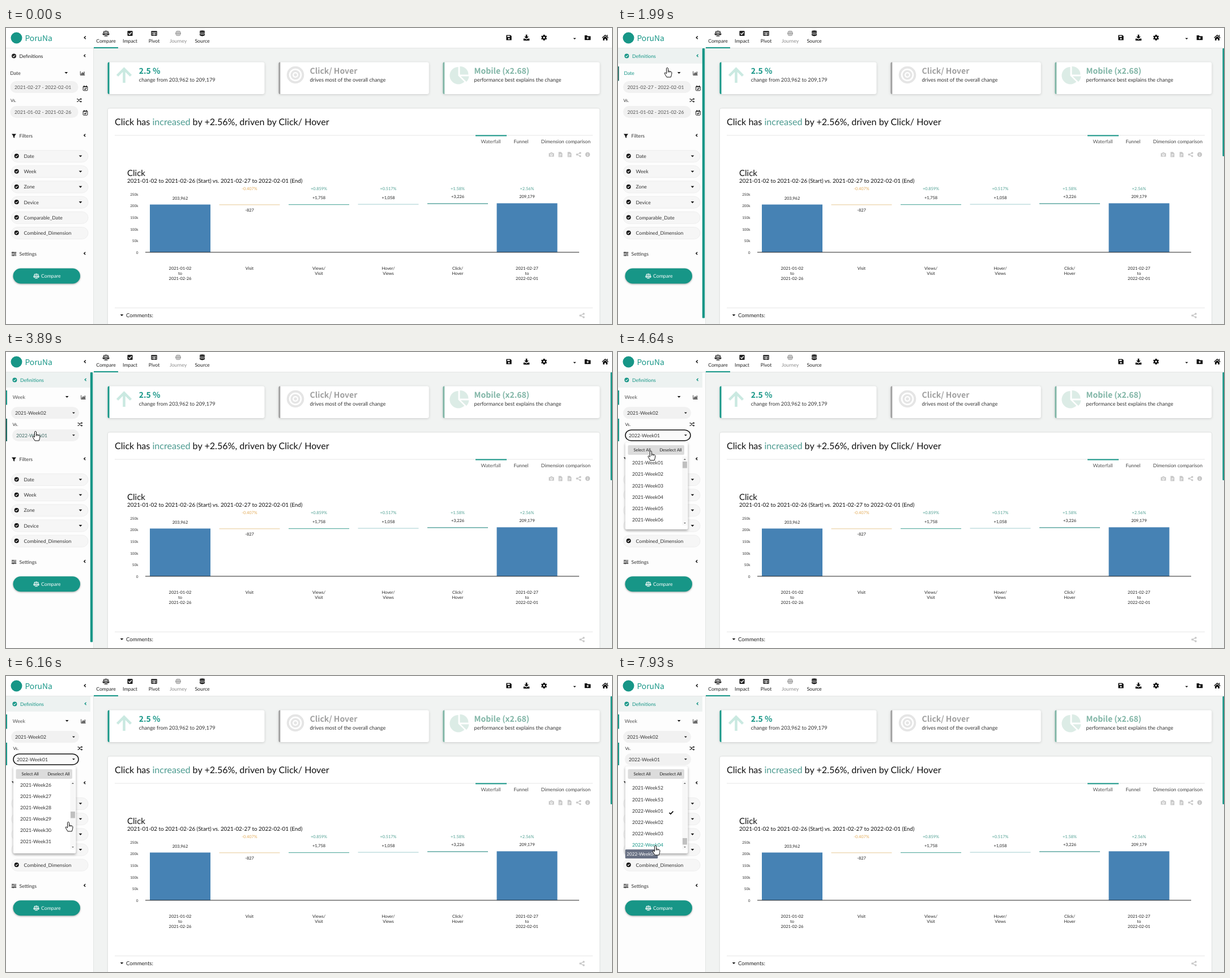
Animation of 1070x524 px, one loop 8000 ms. Source, as an HTML page:

```html
<!DOCTYPE html>
<html lang="en">
<head>
<meta charset="utf-8">
<title>Compare dashboard</title>
<style>
html, body { margin: 0; width: 100%; height: 100%; overflow: hidden; background: #fff; }
svg { display: block; }
text { font-family: Lato, "Open Sans", sans-serif; text-rendering: geometricPrecision; white-space: pre; }
.head { font-family: "Noto Sans CJK JP", "Noto Sans CJK SC", "Open Sans", sans-serif; font-weight: 700; }
.m { text-anchor: middle; }
.e { text-anchor: end; }
.line { fill: none; stroke: currentColor; stroke-width: 2; }
.cut { fill: none; stroke: #fff; stroke-width: 2; }
.card { fill: #fff; filter: drop-shadow(0 1px 2px rgba(0, 0, 0, .16)); }
.menu { fill: #fff; filter: drop-shadow(0 2px 2px rgba(0, 0, 0, .35)); }
.cur { fill: #fff; stroke: #111; stroke-width: 1; stroke-linejoin: round; }
</style>
</head>
<body>
<svg id="stage" width="1070" height="524" viewBox="0 0 1070 524"></svg>
<script>
const TEAL = '#179687', DARK = '#0d5f56', INK = '#333', PALE = '#c6c6c6';
const $ = id => document.getElementById(id);

// Icons live in a 16 x 16 box.
const icons = {
  check: '<circle cx="8" cy="8" r="7.5"/><path class="cut" d="M4.3 8.2 7 10.8 11.8 5.6"/>',
  filter: '<path d="M.5 1.5h15L10 8.5v6.5l-4-2.5v-4z"/>',
  sliders: '<path class="line" d="M0 3h16M0 8h16M0 13h16M4.5 1v4M11.5 6v4M5.5 11v4"/>',
  chev: '<path class="line" style="stroke-width:3" d="M10.5 3 5.5 8l5 5"/>',
  caret: '<path d="M1.5 4.5h13L8 11.5z"/>',
  scale: '<path class="line" style="stroke-width:1.5" d="M8 1v13M4 14.2h8M2.5 3.3h11M3.3 4 .9 9.8h4.8zM12.7 4l-2.4 5.8h4.8z"/><path d="M0 9.5h6.6a3.3 2.8 0 0 1-6.6 0zM9.4 9.5H16a3.3 2.8 0 0 1-6.6 0z"/>',
  box: '<rect x="1" y="1" width="14" height="14" rx="2"/><path class="cut" d="M4 8l3 3 5.3-6"/>',
  table: '<rect x="0" y="1.5" width="16" height="13" rx="1.5"/><path class="cut" style="stroke-width:1.6" d="M1.5 6.2h13M1.5 10.2h13M8 6v7.5"/>',
  globe: '<circle cx="8" cy="8" r="7.5"/><path class="cut" style="stroke-width:1" d="M.5 5.5h15M.5 10.5h15M8 0v16"/><ellipse class="cut" style="stroke-width:1" cx="8" cy="8" rx="3.6" ry="7.5"/>',
  db: '<ellipse cx="8" cy="2.7" rx="7" ry="2.7"/><path d="M1 4.5q7 3.6 14 0v3q-7 3.6-14 0zM1 9q7 3.6 14 0v4q-7 5-14 0z"/>',
  save: '<path d="M1 1h11l3 3v11H1z"/><path fill="#fff" d="M3.5 3h7v3.4h-7z"/><circle cx="8" cy="11" r="2.2" fill="#fff"/>',
  load: '<path d="M6 0h4v5.5h4L8 11 2 5.5h4zM0 10.5h4l4 3 4-3h4V16H0z"/>',
  gear: '<circle cx="8" cy="8" r="4.3" class="line" style="stroke-width:3.6"/><path class="line" style="stroke-width:3" d="M8 0v3M8 13v3M1 4l2.6 1.5M12.4 10.5 15 12M1 12l2.6-1.5M12.4 5.5 15 4"/>',
  folder: '<path d="M0 2h6l2 2h8v10.5H0z"/><path class="cut" d="M8 6v6M5 9h6"/>',
  home: '<path d="M8 .8 16 8l-1.2 1.3L8 3.3 1.2 9.3 0 8zM8 4.8l5.5 4.9V15H9.8v-4H6.2v4H2.5V9.7zM12 1.5h2v4l-2-2z"/>',
  camera: '<path d="M0 3.5h4L5.5 1.5h5L12 3.5h4v11H0z"/><circle class="cut" cx="8" cy="8.8" r="3"/>',
  file: '<path d="M2 0h7.5L14 4.5V16H2z"/><path class="cut" style="stroke-width:1.5" d="M5 7h6M5 10h6M5 13h3"/>',
  share: '<path class="line" d="M13 3 3 8l10 5"/><circle cx="13" cy="3" r="3"/><circle cx="3" cy="8" r="3"/><circle cx="13" cy="13" r="3"/>',
  info: '<circle cx="8" cy="8" r="7.5"/><path class="cut" d="M8 7v5.5M8 3.5v2"/>',
  bars: '<path class="line" style="stroke-width:1.5" d="M1 1.5v13h15"/><path class="line" d="M4.5 13V8.5M7.5 13V4.5M10.5 13V7M13.5 13V3"/>',
  shuffle: '<path class="line" d="M0 4h3l7 8h3M0 12h3l7-8h3"/><path d="M12 .8 16 4l-4 3.2zM12 8.8l4 3.2-4 3.2z"/>',
  cal: '<rect class="line" style="stroke-width:1.6" x="1.5" y="2.8" width="13" height="12.4" rx="1.5"/><path class="line" d="M1.5 4.2h13M4.5 0v4M11.5 0v4M5 9.8l2.2 2.2 4-4.4"/>',
  tick: '<path class="line" style="stroke-width:3.2" d="M1.5 8.5 6 12.7 14.5 3.5"/>'
};
const icon = (name, cx, cy, size, color = '#111', extra = '') =>
  `<g ${extra} transform="translate(${cx - size / 2} ${cy - size / 2}) scale(${size / 16})" color="${color}" fill="currentColor">${icons[name]}</g>`;
const text = (x, y, size, str, color = INK, extra = '') =>
  `<text x="${x}" y="${y}" font-size="${size}" fill="${color}" ${extra}>${str}</text>`;
const rect = (x, y, w, h, fill, extra = '') =>
  `<rect x="${x}" y="${y}" width="${w}" height="${h}" fill="${fill}" ${extra}/>`;
const mid = 'class="m"', end = 'class="e"';

function header() {
  const tabs = [['scale', 'Compare', 176.5], ['box', 'Impact', 219], ['table', 'Pivot', 261.5],
    ['globe', 'Journey', 304], ['db', 'Source', 346.5]];
  const tools = [['save', 888], ['load', 919], ['gear', 950], ['folder', 1027], ['home', 1058]];
  return rect(0, 0, 1070, 36, '#fff') + rect(0, 35, 1070, 1, '#e4e6e5') +
    `<circle cx="18.5" cy="17.5" r="10" fill="${TEAL}"/>` +
    text(33.5, 23, 13.8, 'PoruNa', TEAL, 'class="head" style="font-weight:500"') +
    icon('chev', 139.5, 17, 8) + rect(155, 34, 43, 2, TEAL) +
    tabs.map(([i, s, x]) => {
      const c = i === 'globe' ? '#8c8c8c' : '#222';
      return icon(i, x, 9.5, i === 'scale' ? 12 : 10.5, c) + text(x, 25.6, 8.7, s, c, mid);
    }).join('') +
    tools.map(([i, x]) => icon(i, x, 17, i === 'home' ? 11.5 : 10.5, '#000')).join('') +
    icon('caret', 1004, 19, 6, '#000');
}

function card(x, w, color, title, sub, tint, art) {
  return `<rect class="card" x="${x}" y="60.5" width="${w}" height="56.5" rx="3.5"/>` +
    `<path fill="${color}" d="M${x + 3} 60.5h-.5q-2.5 0-2.5 3v50.500q0 3 2.500 3h.5z"/>` +
    `<g color="${tint}" fill="currentColor">${art}</g>` +
    text(x + 55.3, 81, 14, title, color, 'class="head"') + text(x + 55.3, 94.6, 9.25, sub);
}

function cards() {
  return card(179.5, 277, TEAL, '2.5 %', 'change from 203,962 to 209,179', '#cae9e1',
      '<path class="line" style="stroke-width:4.500" d="M208.500 97V73M196.500 84.500l12-12 12 12"/>') +
    card(481.3, 265.500, '#a0a0a0', 'Click/ Hover', 'drives most of the overall change', '#e5e5e5',
      '<circle class="line" style="stroke-width:4" cx="511" cy="83" r="13.300"/><circle class="line" style="stroke-width:3.500" cx="511" cy="83" r="6.800"/><circle cx="511" cy="83" r="2.800"/>') +
    card(771.3, 277, '#80b5a6', 'Mobile (x2.68)', 'performance best explains the change', '#dcece6',
      '<path d="M798.500 69v15.500l10.800 10.800A15.300 15.300 0 1 1 798.500 69zM801.500 68a14.500 14.500 0 0 1 15 14.500h-15zM803 85.500h14.500q-.5 5.500-4.500 9.700z"/>');
}

function chart() {
  const green = '#4f9f92', blue = '#4682b4';
  const steps = [
    ['', '203,962', 303.5, ['2021-01-02', 'to', '2021-02-26'], 312.500, 84.500, blue],
    ['-0.407%', '-827', 325.3, ['Visit'], 312.300, 1.200, '#ecd2a6'],
    ['+0.859%', '+1,758', 303, ['Views/', 'Visit'], 312, 1.200, '#5fb0a4'],
    ['+0.517%', '+1,058', 302.500, ['Hover/', 'Views'], 311.500, 1.200, '#b3d6d8'],
    ['+1.58%', '+3,226', 301.300, ['Click/', 'Hover'], 310.300, 1.300, '#479a93'],
    ['+2.56%', '209,179', 301, ['2021-02-27', 'to', '2022-02-01'], 310.300, 86.700, blue]
  ];
  return text(214, 261.500, 15, 'Click', '#111') +
    text(214, 273.500, 9.85, '2021-01-02 to 2021-02-26 (Start) vs. 2021-02-27 to 2022-02-01 (End)', '#111') +
    ['0', '50k', '100k', '150k', '200k', '250k'].map((s, i) =>
      text(233.500, 399.700 - 20.600 * i, 6.400, s, INK, end)).join('') +
    steps.map(([pct, val, y, names, top, h, color], i) => {
      const cx = 307.500 + 122.500 * i;
      return rect(cx - 53.500, top, 107, h, color) +
        text(cx, 287, 7.400, pct, i === 1 ? '#e3ac5a' : green, mid) + text(cx, y, 7.400, val, '#222', mid) +
        names.map((s, n) => text(cx, 428 + 9 * n, 7.400, s, '#222', mid)).join('');
    }).join('') + rect(246, 396.500, 766, 1, '#222');
}

function panel() {
  return `<rect class="card" x="180" y="142.500" width="868" height="400" rx="3" style="filter:drop-shadow(0 0 1px rgba(0,0,0,.18))"/>` +
    text(192, 172, 16.100, `Click has <tspan fill="#4b9a8f">increased</tspan> by +2.56%, driven by Click/ Hover`, '#111') +
    rect(192, 189.500, 844, 1, '#e6e6e6') + rect(829, 189.500, 55, 2, TEAL) +
    text(856, 204.300, 8.700, 'Waterfall', '#555', mid) + text(909.500, 204.300, 8.700, 'Funnel', '#444', mid) +
    text(1032, 204.300, 8.700, 'Dimension comparison', '#444', end) +
    ['camera', 'file', 'file', 'share', 'info'].map((s, i) => icon(s, 963 + 16 * i, 224, 9, PALE)).join('') +
    chart() + rect(192, 495, 844, 1, '#e6e6e6') + icon('caret', 204.500, 508.500, 7) +
    text(212, 511.600, 9.600, 'Comments:', '#222') + icon('share', 1017, 509, 9.500, PALE);
}

const pill = (x, y, w, extra = '') => rect(x, y, w, 21, '#f1f1f1', `rx="10.500" ${extra}`);

function filters() {
  const row = (name, y, arrow) => rect(9.500, y - 10.500, 135.500, 21, '#f6f6f6', 'rx="10.500" stroke="#ebebeb" stroke-width=".8"') +
    icon('check', 18.700, y - .500, 8.500) + text(31.500, y + 3, 8.700, name) + (arrow ? icon('caret', 131.500, y, 7) : '');
  return icon('filter', 14, 191, 8.500) + text(23.500, 194, 8.700, 'Filters') + icon('chev', 139, 190, 7.500) +
    ['Date', 'Week', 'Zone', 'Device'].map((s, i) => row(s, 227 + 27.200 * i, true)).join('') +
    `<g id="extra">${row('Comparable_Date', 335.800)}</g><g id="tail">` +
    row('Combined_Dimension', 363) +
    icon('sliders', 14, 400, 8.500) + text(23.500, 403, 8.700, 'Settings') + icon('chev', 139, 399, 7.500) +
    `<rect x="12.500" y="425.500" width="118.500" height="27" rx="13.500" fill="${TEAL}" style="filter:drop-shadow(0 1.500px 1.500px rgba(0,0,0,.35))"/>` +
    icon('scale', 53.500, 439, 10.500, '#fff') + text(62, 442.200, 8.700, 'Compare', '#fff') + '</g>';
}

function definitions() {
  return rect(0, 36, 149, 27, '#edf2f1', 'id="hot"') +
    `<g id="title">${icon('check', 14, 49.500, 8.500, 'inherit')}${text(23.500, 52.700, 8.700, 'Definitions', 'currentColor')}${icon('chev', 139, 49, 7.500, 'inherit')}</g>` +
    rect(0, 68, 2, 25.500, TEAL, 'id="edgeA"') + rect(0, 118, 2, 40, TEAL, 'id="edgeB"') +
    `<g id="defs"><g id="kind">${text(7.300, 82.500, 8.700, 'Date', INK, 'id="kindText"')}</g>` +
    icon('caret', 106.300, 79.500, 7) + icon('bars', 135, 80, 8.500) + icon('shuffle', 129.500, 128, 9) +
    `<g id="dates">${pill(7.600, 94, 120)}${text(15, 107.600, 8.600, '2021-02-27 - 2022-02-01', '#555')}${icon('cal', 140, 106.500, 9.500)}` +
    `${pill(7.600, 138, 120)}${text(15, 151.600, 8.600, '2021-01-02 - 2021-02-26', '#555')}${icon('cal', 140, 150, 9.500)}</g>` +
    `<g id="weeks">${pill(7.600, 97.300, 120)}${text(14.600, 111, 8.650, '2021-Week02')}${icon('caret', 118, 108, 6)}` +
    `${pill(7.600, 137, 120, 'id="pick"')}${icon('caret', 118, 147.500, 6)}</g>` +
    `<g id="vs">${text(8, 131.200, 7.700, 'Vs.')}${text(14.600, 151, 8.650, '2022-Week01', INK, 'id="pickText"')}</g></g>`;
}

const ROW = 20.14;
function menus() {
  const weeks = Array.from({ length: 57 }, (_, i) => {
    const n = i < 53 ? i + 1 : i - 52;
    return text(25, 199.300 + ROW * i, 8.650, `${i < 53 ? 2021 : 2022}-Week${String(n).padStart(2, '0')}`, INK, i === 56 ? 'id="last"' : '');
  }).join('');
  return `<g id="kindMenu"><rect class="menu" x="12" y="93" width="108" height="69" rx="2.500"/>` +
    ['Date', 'Week', 'Zone'].map((s, i) => text(25, 111 + 20 * i, 8.650, s, INK, `id="opt${i}"`)).join('') + '</g>' +
    `<g id="weekMenu"><rect class="menu" x="12.800" y="160" width="110.500" height="154" rx="2.500"/>` +
    rect(17.500, 165, 99.500, 17, '#dcdcdc', 'rx="2"') +
    text(42.700, 176, 7.500, 'Select All', '#222', mid) + text(93, 176, 7.500, 'Deselect All', '#222', mid) +
    `<g clip-path="url(#view)"><g id="list">${weeks}${icon('tick', 94, 199.500 + ROW * 53, 8.500, '#000')}</g></g>` +
    rect(113.500, 185, 8.800, 122, '#f7f7f7') + rect(114, 194, 8, 11.500, '#c0c0c0', 'id="thumb"') +
    icon('caret', 118, 303, 4.500, '#666') + `<path d="M115.900 191l2-2.200 2 2.200z" fill="#666"/></g>` +
    `<g id="tip">${rect(12.800, 0, 57.500, 16, '#697184', 'rx="1.500"')}${text(15.300, 11, 8.100, '', '#fff', 'id="tipText"')}</g>`;
}

const pointer = `<g id="pointer"><path id="arrow" class="cur" d="M0 0v13l3-2.800 2 4.600 2-.9-2-4.400h4.200z"/>
  <g id="hand" class="cur"><path d="M-1.500 1.300Q0-.800 1.500 1.300V6l3 .6 2.600 1 .9 1.400-.4 3.500L6.300 17H-1l-3.700-6.200q-.7-1.600 1-1.700l2.200 1.700z"/><path fill="none" d="M1.500 6v3M4.300 6.700V9"/></g></g>`;

$('stage').innerHTML = '<clipPath id="view"><rect x="14" y="186" width="99" height="121"/></clipPath>' +
  rect(0, 0, 1070, 524, '#f1f3f2') + cards() + panel() +
  rect(0, 36, 154, 488, '#fdfdfd') + rect(154, 36, 1, 488, '#e4e6e5') + header() +
  definitions() + `<g id="filters">${filters()}</g>` +
  rect(148.800, 36, 4.400, 477.500, TEAL, 'id="sideBar" rx="1"') +
  rect(1067.500, 36, 4, 191, TEAL, 'id="mainBar" rx="1"') + menus() + pointer;

// [time, x, y] stops of the pointer and [time, offset] stops of the list.
const path = [[560, 640, 523], [1000, 160, 430], [1290, 118, 349], [1980, 87, 70], [2120, 87, 70], [2390, 80, 70],
  [2590, 80, 70], [3150, 48, 122], [3400, 48, 122], [3860, 52, 140], [4400, 52, 140], [5050, 71, 252], [5110, 71, 252],
  [5600, 113, 240], [6160, 110, 258], [6500, 118, 280], [6780, 119, 284], [6980, 127, 341], [7240, 127, 341],
  [7310, 126, 342], [7900, 66, 300]];
const scroll = [[5300, 0], [6160, 506.500], [6900, 1025]];
const ramp = (t, a, b) => Math.min(1, Math.max(0, (t - a) / (b - a)));

function along(stops, t, ease = k => k) {
  let i = 0;
  while (i < stops.length - 2 && t >= stops[i + 1][0]) i++;
  const a = stops[i], b = stops[i + 1], k = ease(ramp(t, a[0], b[0]));
  return a.slice(1).map((v, n) => v + (b[n + 1] - v) * k);
}
const show = (id, on) => { $(id).style.display = on ? '' : 'none'; };
const move = (id, x, y = 0) => $(id).setAttribute('transform', `translate(${x} ${y})`);
const set = (id, attrs) => { for (const k in attrs) $(id).setAttribute(k, attrs[k]); };

function draw(t) {
  const within = (a, b = 8000) => t >= a && t < b;
  const week = within(3400), dx = within(1000) ? 1.4 : 0;
  const over = ramp(t, 3790, 3940) - ramp(t, 7230, 7300) + ramp(t, 7520, 7670);

  show('mainBar', within(600));
  show('sideBar', within(1000, 4000));
  show('hot', within(1650));
  set('title', { color: within(1650) ? TEAL : '#222' });
  move('title', dx);
  move('defs', dx);
  move('kind', 3 * ramp(t, 1850, 2100));
  $('kindText').textContent = week ? 'Week' : 'Date';
  set('kindText', { fill: within(1850, 3400) ? TEAL : week ? '#555' : INK });
  show('edgeA', within(1850));
  set('edgeA', { fill: week ? TEAL : DARK, width: 2 * ramp(t, 1750, 2050) });
  show('edgeB', over > 0);
  set('edgeB', { fill: t < 4300 ? DARK : TEAL, width: 2 * Math.min(1, over * 1.4) });

  show('dates', !week);
  show('weeks', week);
  show('pickText', week);
  move('vs', 3 * over);
  const focus = within(4300, 6650);
  set('pick', { x: 7.6 + (focus ? 4 : 3 * over), width: 120 - (focus ? 5 : 3 * over),
    y: focus ? 138 : 137, height: focus ? 19 : 21,
    stroke: focus ? '#111' : 'none', 'stroke-width': 1.5, fill: focus ? '#fafafa' : '#f1f1f1' });
  set('pickText', { fill: within(3800, 4300) ? '#3e6b66' : INK });

  move('filters', 0, week ? -1 : 0);
  show('extra', !week);
  move('tail', 0, week ? -27.3 : 0);

  const [x, y] = along(path, t, k => k * k * (3 - 2 * k));
  const arrow = t < 1000 || within(4950, 5400);
  show('pointer', within(560));
  show('arrow', arrow);
  show('hand', !arrow);
  move('pointer', x, y);

  show('kindMenu', within(2250, 3400));
  for (let i = 0; i < 3; i++)
    set('opt' + i, { fill: Math.abs(y - 107 - 20 * i) < 10 || (i === 1 && y > 116) ? TEAL : INK });

  const [s] = along(scroll, t);
  show('weekMenu', within(4350));
  move('weekMenu', 3 * (over - 1));
  move('list', 0, -s);
  move('thumb', 0, s * .0907);
  const last = within(7780);
  set('last', { fill: last ? TEAL : INK });
  show('tip', last || within(4950, 5200));
  move('tip', 0, last ? 307 : 244.5);
  $('tipText').textContent = last ? '2022-Week04' : '2021-Week03';
}

const start = performance.now();
function tick() {
  draw((performance.now() - start) % 8000);
  requestAnimationFrame(tick);
}
tick();
</script>
</body>
</html>
```
